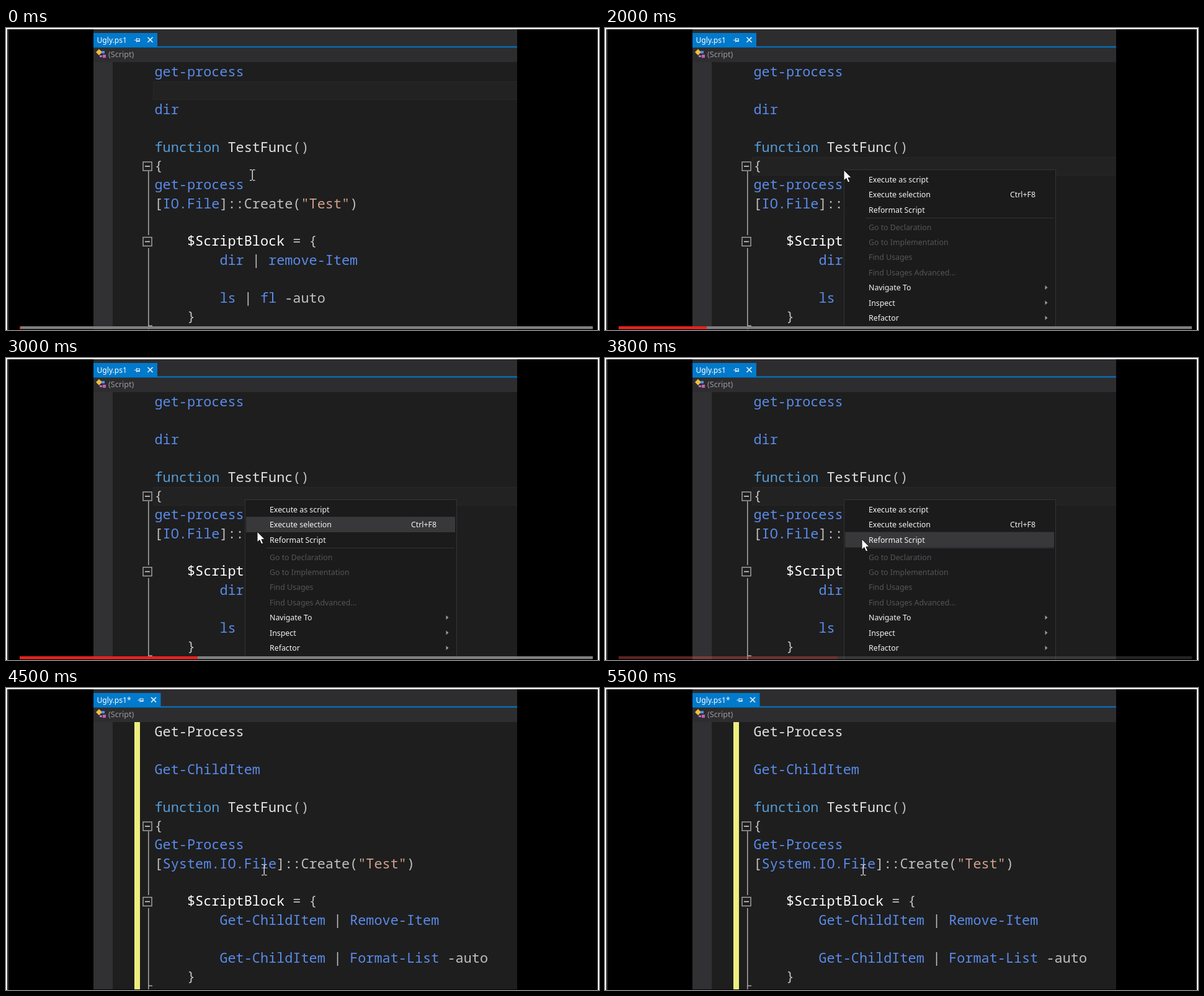
Write an HTML page with a canvas that moves like this. It is 956x487 px and loops after 5.6 s.

```html
<!DOCTYPE html>
<html lang="en">
<head>
<meta charset="utf-8">
<title>Script reformatting</title>
<style>
  html, body { margin: 0; width: 100%; height: 100%; overflow: hidden; background: #fff; }
  canvas { display: block; }
</style>
</head>
<body>
<canvas id="stage" width="956" height="487"></canvas>
<script>
const ctx = document.getElementById('stage').getContext('2d');
const LOOP = 5600, STEP = 100;
const CLICK = 1800, MENU_OPEN = 2000, MENU_CLOSE = 4000, REFORMAT = 4200;
const CODE_FONT = '500 21.85px "Noto Sans Mono", monospace';
const uiFont = size => `${size}px "Noto Sans", sans-serif`;

const CMD = '#5a8bea', KEY = '#569cd6', TXT = '#c0c0c0', NAME = '#e2e2e2', STR = '#d0a08c', VAR = '#ffffff';

// Each line: row, column, then colour and text pairs.
const sharedLines = [
  [4, 0, KEY, 'function ', NAME, 'TestFunc', TXT, '()'],
  [5, 0, TXT, '{'],
  [9, 4, VAR, '$ScriptBlock', TXT, ' = {'],
  [13, 4, TXT, '}'],
];
const uglyLines = [
  [0, 0, CMD, 'get-process'],
  [2, 0, CMD, 'dir'],
  [6, 0, CMD, 'get-process'],
  [7, 0, TXT, '[', CMD, 'IO.File', TXT, ']::Create(', STR, '"Test"', TXT, ')'],
  [10, 8, CMD, 'dir', TXT, ' | ', CMD, 'remove-Item'],
  [12, 8, CMD, 'ls', TXT, ' | ', CMD, 'fl', TXT, ' -auto'],
];
const cleanLines = [
  [0, 0, NAME, 'Get-Process'],
  [2, 0, CMD, 'Get-ChildItem'],
  [6, 0, CMD, 'Get-Process'],
  [7, 0, TXT, '[', CMD, 'System.IO.File', TXT, ']::Create(', STR, '"Test"', TXT, ')'],
  [10, 8, CMD, 'Get-ChildItem', TXT, ' | ', CMD, 'Remove-Item'],
  [12, 8, CMD, 'Get-ChildItem', TXT, ' | ', CMD, 'Format-List', TXT, ' -auto'],
];

const menuItems = [
  [244, 'Execute as script'],
  [268.5, 'Execute selection', 'Ctrl+F8'],
  [293, 'Reformat Script'],
  [321, 'Go to Declaration', 'off'],
  [345, 'Go to Implementation', 'off'],
  [369.5, 'Find Usages', 'off'],
  [394, 'Find Usages Advanced...', 'off'],
  [418.5, 'Navigate To', 'more'],
  [443, 'Inspect', 'more'],
  [467.5, 'Refactor', 'more'],
];

const pointerPath = [
  [900, 397, 237], [1300, 388, 229], [1700, 385, 229], [2500, 385, 229],
  [3000, 405, 280], [3400, 414, 292], [4100, 414, 292], [4200, 416, 293],
];
const progressPath = [[900, 24], [1300, 78], [1500, 109], [2400, 208], [3000, 309], [3400, 375]];

function along(path, t) {
  const next = path.findIndex(key => key[0] > t);
  if (next === 0) return path[0].slice(1);
  if (next < 0) return path[path.length - 1].slice(1);
  const a = path[next - 1], b = path[next];
  const k = (t - a[0]) / (b[0] - a[0]);
  return a.slice(1).map((v, i) => v + (b[i + 1] - v) * k);
}

function rect(x, y, w, h, color) {
  ctx.fillStyle = color;
  ctx.fillRect(x, y, w, h);
}

function text(str, x, y, color, font) {
  ctx.font = font;
  ctx.fillStyle = color;
  ctx.fillText(str, x, y);
}

function polygon(points, fill, stroke) {
  ctx.beginPath();
  points.forEach(([x, y]) => ctx.lineTo(x, y));
  ctx.closePath();
  ctx.fillStyle = fill;
  ctx.fill();
  if (stroke) {
    ctx.strokeStyle = stroke;
    ctx.lineWidth = 1;
    ctx.stroke();
  }
}

function drawLine([row, column, ...parts]) {
  let x = 239.5 + column * 13.11;
  for (let i = 0; i < parts.length; i += 2) {
    text(parts[i + 1], x, 78 + row * 30.38, parts[i], CODE_FONT);
    x += parts[i + 1].length * 13.11;
  }
}

function drawTab(modified) {
  const shift = modified ? 5.5 : 0;
  rect(141, 8, 103 + shift, 22, '#007acc');
  rect(141, 29.5, 683, 2, '#007acc');
  text(modified ? 'Ugly.ps1*' : 'Ugly.ps1', 146.5, 24, '#fff', uiFont(12.1));

  const x = 207 + shift;
  rect(x, 19, 4, 1, '#e0eefa');
  rect(x + 3, 16, 1, 7, '#e0eefa');
  rect(x + 4, 17, 5, 1, '#e0eefa');
  rect(x + 4, 20, 5, 2, '#e0eefa');
  rect(x + 8, 17, 1, 5, '#e0eefa');

  ctx.strokeStyle = '#f0f6fc';
  ctx.lineWidth = 1.6;
  ctx.beginPath();
  ctx.moveTo(228.5 + shift, 15); ctx.lineTo(236.5 + shift, 23);
  ctx.moveTo(236.5 + shift, 15); ctx.lineTo(228.5 + shift, 23);
  ctx.stroke();
}

function drawWindow(modified) {
  rect(0, 0, 956, 487, '#fff');
  rect(2, 2, 952, 485, '#000');
  rect(3, 2, 1, 485, '#555');
  rect(141, 2, 683, 484, '#2d2d30');
  rect(141, 55, 31, 431, '#313134');
  rect(172, 55, 652, 431, '#1e1e1e');
  drawTab(modified);

  polygon([[145, 39], [150, 34], [155, 39], [150, 44]], '#f0c040');
  rect(154, 37, 5, 4, '#4f8fe0');
  rect(151, 44, 4, 3, '#b070d0');
  rect(156, 43, 5, 5, '#c45fb0');
  text('(Script)', 165, 47, '#9b9b9b', uiFont(12.6));
}

function drawFolds() {
  const gray = '#a8a8a8';
  rect(229, 231, 1.5, 103, gray);
  rect(229, 355, 1.5, 131, gray);
  rect(229, 479.5, 7, 1.5, gray);
  for (const y of [223, 344.5]) {
    ctx.strokeStyle = gray;
    ctx.lineWidth = 1.4;
    ctx.strokeRect(221, y - 7, 14, 14);
    rect(224, y - 0.8, 8, 1.6, '#d0d0d0');
  }
}

function drawCurrentLine(y) {
  rect(237, y, 587, 30, '#272727');
  rect(238, y + 1, 586, 28, '#222222');
}

function drawMenu(pointerY) {
  const hovered = pointerY < 232 ? -1 : Math.floor((pointerY - 232) / 24.5);
  rect(385, 228, 342, 258, '#333336');
  rect(386, 229, 340, 257, '#1b1b1c');
  menuItems.forEach(([y, label, extra], i) => {
    if (i === hovered) rect(387, y - 12.5, 337, 25, '#38383a');
    text(label, 425, y + 4.5, extra === 'off' ? '#555556' : '#f4f4f4', uiFont(12.35));
    if (extra === 'Ctrl+F8') text(extra, 653, y + 4.5, '#f4f4f4', uiFont(12.35));
    if (extra === 'more') polygon([[709.5, y - 3.5], [713.5, y], [709.5, y + 3.5]], '#999');
  });
  rect(420, 306, 303, 1, '#333336');
}

function drawIBeam(x, y) {
  rect(x - 0.5, y - 8, 1.5, 16, '#d8d8d8');
  for (const end of [y - 9, y + 8]) {
    rect(x - 4, end, 3.5, 1.3, '#d8d8d8');
    rect(x + 1, end, 3.5, 1.3, '#d8d8d8');
  }
}

function drawArrow(x, y) {
  const outline = [[0, 0], [0, 17], [4, 13.5], [6.7, 20], [9.6, 18.8], [6.9, 12.5], [12, 12.2]];
  polygon(outline.map(([dx, dy]) => [x + dx, y + dy]), '#fff', '#111');
}

function drawProgress(t) {
  ctx.globalAlpha = Math.min(1, Math.max(0, (3900 - t) / 350));
  const [end] = along(progressPath, t);
  rect(22, 481, 924, 4.5, '#808080');
  rect(22, 481, end - 22, 4.5, '#e8211d');
  ctx.globalAlpha = 1;
}

function draw(t) {
  const clean = t >= REFORMAT;
  const menuOpen = t >= MENU_OPEN && t < MENU_CLOSE;
  const [x, y] = along(pointerPath, t);

  drawWindow(clean);
  if (clean) rect(207, 55, 9, 431, '#eeee80');
  else drawCurrentLine(t < CLICK ? 86 : 208);
  drawFolds();

  ctx.save();
  ctx.beginPath();
  ctx.rect(172, 55, 652, 431);
  ctx.clip();
  [...sharedLines, ...(clean ? cleanLines : uglyLines)].forEach(drawLine);
  if (menuOpen) drawMenu(y);
  (menuOpen ? drawArrow : drawIBeam)(x, y);
  ctx.restore();

  drawProgress(t);
}

const start = performance.now();
function tick() {
  const t = (performance.now() - start) % LOOP;
  draw(Math.floor(t / STEP) * STEP);
  requestAnimationFrame(tick);
}
tick();
</script>
</body>
</html>
```
